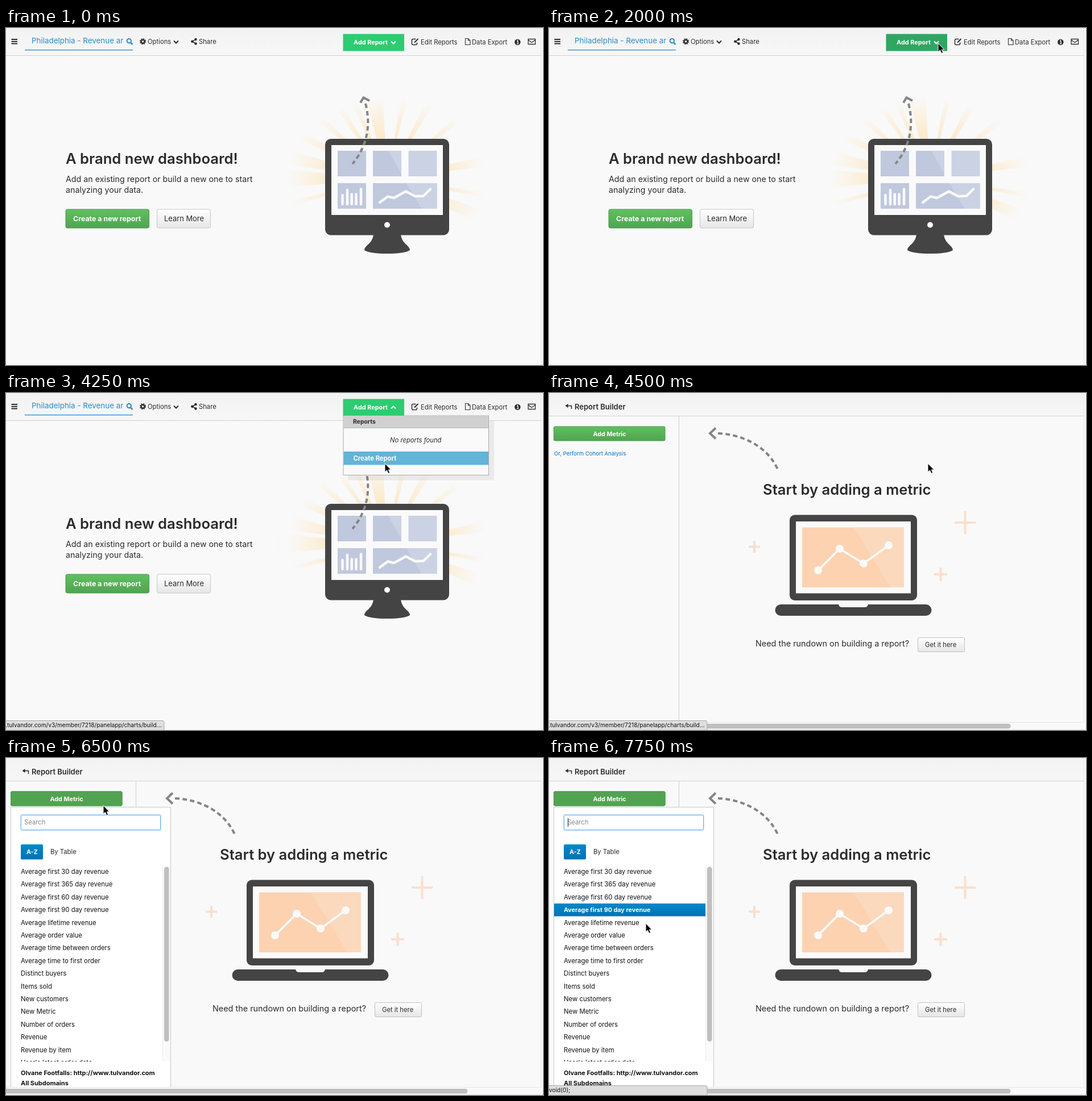
An HTML page for the animation above (8 s loop, 944 by 593 pixels).

```html
<!DOCTYPE html>
<html lang="en">
<head>
<meta charset="utf-8">
<title>Report builder walkthrough</title>
<style>
html, body { margin: 0; width: 100%; height: 100%; overflow: hidden; background: #f9f9f9; }
svg { display: block; width: 944px; height: 593px; font: 11.25px Inter, "Open Sans", sans-serif; font-optical-sizing: none; fill: #2b2b2b; }
.bold { font-weight: 700; }
.white { fill: #fff; }
.head { font-size: 25.6px; font-weight: 600; }
.copy { font-size: 14.25px; }
.line { fill: none; stroke: #2b2b2b; stroke-width: 1.5; }
.thick { stroke-width: 2; }
.dash { fill: none; stroke: #858585; stroke-width: 4; stroke-dasharray: 8 5.3; }
.tip { fill: none; stroke: #858585; stroke-width: 4; }
.plot { fill: none; stroke: #fafafa; stroke-width: 4.5; stroke-linecap: round; stroke-linejoin: round; }
.thin { stroke-width: 3.6; }
.dark { fill: #444; }
.plus { fill: none; stroke: #fbdfcd; stroke-width: 4; }
.status { font-size: 10.2px; fill: #111; }
.status rect { fill: #dedede; stroke: #a9a9a9; }

/* Every change is a hard cut on a quarter-second grid: 3.125% = 250 ms */
.timed { animation: 8s step-end infinite; }
#cursor { animation-name: travel; }
#addReport { animation-name: addHover; }
#chevron { animation-name: flip; transform-box: fill-box; transform-origin: center; }
#menu { animation-name: menu; }
#createRow { animation-name: createRow; }
#linkStatus { animation-name: linkStatus; }
#builder { animation-name: builder; }
#metricHover { animation-name: metricHover; }
#picker { animation-name: picker; }
#caret { animation-name: caret; }
#rowHover, #voidStatus { animation-name: rowHover; }

@keyframes travel {
  0% { transform: translate(-40px, 12px); }
  3.125% { transform: translate(833px, 12px); }
  6.25% { transform: translate(490px, 40px); }
  9.375% { transform: translate(232px, 139px); }
  18.75% { transform: translate(300px, 138px); }
  21.875% { transform: translate(570px, 66px); }
  25% { transform: translate(684px, 27px); }
  43.75% { transform: translate(685px, 48px); }
  46.875% { transform: translate(676px, 86px); }
  50% { transform: translate(668px, 115px); }
  53.125% { transform: translate(666px, 124px); }
  59.375% { transform: translate(570px, 138px); }
  62.5% { transform: translate(400px, 134px); }
  65.625% { transform: translate(255px, 112px); }
  68.75% { transform: translate(195px, 98px); }
  71.875% { transform: translate(182px, 82px); }
  75% { transform: translate(171px, 83.5px); }
  93.75% { transform: translate(171px, 190px); }
  96.875%, 100% { transform: translate(170px, 291px); }
}
@keyframes addHover { 0%, 43.75%, 100% { fill: #2ecc71; } 25% { fill: #30a663; } }
@keyframes flip { 0%, 56.25%, 100% { transform: none; } 31.25% { transform: scaleY(-1); } }
@keyframes menu { 0%, 56.25%, 100% { visibility: hidden; } 31.25% { visibility: visible; } }
@keyframes createRow { 0%, 56.25%, 100% { visibility: hidden; } 50% { visibility: visible; } }
@keyframes linkStatus { 0%, 59.375%, 100% { visibility: hidden; } 53.125% { visibility: visible; } }
@keyframes builder { 0% { visibility: hidden; } 56.25%, 100% { visibility: visible; } }
@keyframes metricHover { 0% { visibility: hidden; } 71.875%, 100% { visibility: visible; } }
@keyframes picker { 0% { visibility: hidden; } 81.25%, 100% { visibility: visible; } }
@keyframes caret { 0%, 90.625% { visibility: hidden; } 84.375%, 96.875%, 100% { visibility: visible; } }
@keyframes rowHover { 0% { visibility: hidden; } 96.875%, 100% { visibility: visible; } }
</style>
</head>
<body>
<svg viewBox="0 0 944 593">
  <defs>
    <linearGradient id="bar" x2="0" y2="1"><stop stop-color="#f2f2f2"/><stop offset="1" stop-color="#f7f7f7"/></linearGradient>
    <linearGradient id="green" x2="0" y2="1"><stop stop-color="#60c060"/><stop offset="1" stop-color="#51a351"/></linearGradient>
    <linearGradient id="grey" x2="0" y2="1"><stop stop-color="#fff"/><stop offset="1" stop-color="#e6e6e6"/></linearGradient>
    <linearGradient id="blue" x2="0" y2="1"><stop stop-color="#08c"/><stop offset="1" stop-color="#0072b5"/></linearGradient>
    <radialGradient id="glow" gradientUnits="userSpaceOnUse" cx="0" cy="0" r="176" gradientTransform="scale(1 .82)">
      <stop offset=".45" stop-color="#fce8c6"/><stop offset=".75" stop-color="#fbf1e0"/><stop offset="1" stop-color="#f9f9f9"/>
    </radialGradient>
    <clipPath id="listClip"><rect x="9" y="188" width="266" height="346"/></clipPath>
    <clipPath id="paneClip"><rect y="80" width="300" height="499"/></clipPath>
  </defs>

  <!-- Dashboard -->
  <rect width="944" height="593" fill="#f9f9f9"/>
  <rect width="940" height="48" fill="url(#bar)"/>
  <path d="M0 48.5H940" stroke="#d0d0d0"/>
  <path d="M940.5 0V593" stroke="#e4e4e4"/>

  <path d="M9.500 20H20M9.500 23.700H20M9.500 27.400H20" class="line thick"/>
  <g fill="#2a8cc8">
    <text x="45" y="27" font-size="13.400">Philadelphia - Revenue ar</text>
    <rect x="33" y="38" width="190" height="1.300"/>
    <path d="M219.300 25.800L222.500 29" stroke="#2a8cc8" stroke-width="2.500"/>
    <circle cx="216.300" cy="22.600" r="3.700" fill="none" stroke="#2a8cc8" stroke-width="2"/>
  </g>
  <circle cx="240.500" cy="23.700" r="4.600" fill="none" stroke="#333" stroke-width="2" stroke-dasharray="2 1.610"/>
  <circle cx="240.500" cy="23.700" r="3" fill="none" stroke="#333" stroke-width="2.500"/>
  <text x="249" y="28">Options</text>
  <path d="M295 22.500L299 26.500L303 22.500" class="line thick"/>
  <path d="M333.500 20L327.500 23.700L333.500 27.500" class="line"/>
  <circle cx="333.500" cy="20" r="2.200"/><circle cx="327.300" cy="23.700" r="2.200"/><circle cx="333.500" cy="27.500" r="2.200"/>
  <text x="339" y="28">Share</text>

  <rect id="addReport" class="timed" x="592.500" y="10.500" width="107.500" height="30" fill="#2ecc71"/>
  <text x="611" y="29" class="bold white" font-size="10.900">Add Report</text>
  <path id="chevron" class="timed" d="M677 23.500L681 27.500L685 23.500" fill="none" stroke="#fff" stroke-width="2.200"/>
  <path d="M720.500 19.500H715.500Q713.500 19.500 713.500 21.500V27.500Q713.500 29.500 715.500 29.500H720.500Q722.500 29.500 722.500 27.500V25.500" class="line"/>
  <path d="M718 25.500L724.500 19" class="line thick"/>
  <text x="729" y="29">Edit Reports</text>
  <path d="M807.500 18.500H812.500L816 22V29.500H807.500ZM812.500 18.500V22H816" fill="none" stroke="#333" stroke-width="1.100"/>
  <text x="819" y="29">Data Export</text>
  <circle cx="899.300" cy="24.700" r="5.200"/>
  <path d="M898 23.500H900V27.500M897.700 27.700H901.200M898.500 21.500H900.300" fill="none" stroke="#fff" stroke-width="1.300"/>
  <path d="M918 19.500H930.500V28.500H918ZM918 21L924.200 25.500L930.500 21" fill="none" stroke="#333" stroke-width="1.300"/>

  <text x="105" y="239" class="head">A brand new dashboard!</text>
  <text y="271" class="copy"><tspan x="105">Add an existing report or build a new one to start</tspan><tspan x="105" dy="19">analyzing your data.</tspan></text>
  <rect x="105" y="319" width="146.500" height="33" rx="3" fill="url(#green)" stroke="#4b994b"/>
  <text x="118" y="340" class="bold white" font-size="12.400">Create a new report</text>
  <rect x="265.500" y="319" width="94" height="33" rx="3" fill="url(#grey)" stroke="#c6c6c6"/>
  <text x="278" y="340" font-size="12.900">Learn More</text>

  <g id="rays" transform="translate(670 265)" fill="url(#glow)"></g>
  <path class="dark" d="M646 362C645 380 630 382 630 391Q640 397 670 397Q700 397 710 391C710 382 695 380 694 362Z"/>
  <rect class="dark" x="561" y="195" width="218" height="169.500" rx="10"/>
  <rect x="572" y="206" width="196" height="123" fill="#fafafa"/>
  <path d="M583 216h50v45h-50zM645 216h50v45h-50zM583 273h50v45h-50zM645 273h112.500v45H645z" fill="#c0c8dd"/>
  <path d="M707.500 216h50v45h-50zM672 216H695V257ZM704 273H757.500V318H730.500Z" fill="#cbd2e3"/>
  <path class="plot" d="M591.500 294V310M600 285V310M607.700 292.500V310M615.500 292.500V310M624 283.500V310"/>
  <path class="plot" d="M657 307L671 296.500L682 299L703 287.500L719 296L734 295.500L746 283.500"/>
  <circle cx="670" cy="346.500" r="5" class="white"/>
  <path class="dash" d="M632 133C643 175 632 212 609 239"/>
  <path class="tip" d="M623 131.500L628.500 122.500L639 128"/>

  <g id="menu" class="timed">
    <rect x="601" y="49" width="257" height="104.500" fill="#000" fill-opacity=".06"/>
    <rect x="593" y="40" width="255.500" height="104.500" fill="#fafafa" stroke="#aaa"/>
    <rect x="593.500" y="40.500" width="254.500" height="20.500" fill="#d0d0d0"/>
    <path d="M593 61.500H848" stroke="#b4b4b4"/>
    <text x="610" y="54" class="bold" font-size="10.400">Reports</text>
    <text x="675" y="87" font-style="italic">No reports found</text>
    <text x="610.500" y="119" class="bold" font-size="11.200">Create Report</text>
  </g>
  <g id="createRow" class="timed">
    <rect x="593.500" y="103" width="254.500" height="23.500" fill="#62b4d9"/>
    <text x="610.500" y="119" class="bold white" font-size="11.200">Create Report</text>
  </g>

  <!-- Report builder -->
  <g id="builder" class="timed">
    <rect width="944" height="593" fill="#f9f9f9"/>
    <rect width="940" height="40" fill="url(#bar)"/>
    <path d="M0 40.500H940" stroke="#d0d0d0"/>
    <path d="M228.500 41V579" stroke="#cfcfcf"/>
    <path d="M940.500 0V579M0 579.500H941M0 592.500H944" stroke="#e6e6e6" fill="none"/>
    <rect x="-10" y="582" width="821.500" height="8.500" rx="4.200" fill="#bfbfbf"/>
    <path d="M31 22.500H39.500V28" class="line"/>
    <path d="M28.500 22.500L33.500 19V26Z"/>
    <text x="45" y="28.500" font-size="13" font-weight="600">Report Builder</text>
    <rect x="8.500" y="59" width="195.500" height="25" rx="2" fill="url(#green)" stroke="#4b994b"/>
    <rect id="metricHover" class="timed" x="8.500" y="59" width="195.500" height="25" rx="2" fill="#51a351" stroke="#4b994b"/>
    <text x="77.500" y="76" class="bold white" font-size="10.800">Add Metric</text>
    <text x="9" y="109.500" font-size="9.550" fill="#0a6ebd">Or, Perform Cohort Analysis</text>

    <path class="dash" d="M297 71C340 73 383 93 402 134"/>
    <path class="tip" d="M293 61.500L283 71L293 80.500"/>
    <text x="376" y="178.500" class="head" font-size="25.300">Start by adding a metric</text>
    <rect class="dark" x="423" y="214.500" width="224" height="150.500" rx="9"/>
    <rect x="434" y="226" width="202" height="126.500" fill="#fafafa"/>
    <rect x="445" y="236.500" width="179" height="105.500" fill="#fcd2b1"/>
    <path d="M536 236.500H624V342H600Z" fill="#fbd9bd"/>
    <path class="plot thin" d="M473 312L511 274L553 300L597 268"/>
    <g fill="#fafafa"><circle cx="473" cy="312" r="7"/><circle cx="511" cy="274" r="7"/><circle cx="553" cy="300" r="7"/><circle cx="597" cy="268" r="7"/></g>
    <rect class="dark" x="397.500" y="372" width="275" height="20" rx="10"/>
    <path d="M509 371.500H561Q560 377 555 377H515Q510 377 509 371.500Z" fill="#f9f9f9"/>
    <path class="plus" d="M713 228H750M731.500 208V248M351 270.500H371M361 260V281M677 319H700M688.500 307V331"/>
    <text x="363" y="446" font-size="14.400">Need the rundown on building a report?</text>
    <rect x="648.500" y="430.500" width="82" height="25" rx="2" fill="url(#grey)" stroke="#c0c0c0"/>
    <text x="661" y="447">Get it here</text>
  </g>

  <g id="picker" class="timed" clip-path="url(#paneClip)">
    <rect x="8.500" y="86.500" width="281" height="520" fill="#fff" stroke="#c8c8c8"/>
    <rect x="25" y="99" width="248" height="29" rx="3" fill="#cfe6f9"/>
    <rect x="26.500" y="100.500" width="245" height="26" rx="2" fill="#fff" stroke="#5fafee"/>
    <text x="32" y="117" fill="#888">Search</text>
    <rect x="26" y="152" width="39" height="26.500" rx="2" fill="url(#blue)"/>
    <text x="36" y="169" class="bold white" font-size="10.700">A-Z</text>
    <text x="78" y="169">By Table</text>
    <g clip-path="url(#listClip)"><text id="metrics" y="204" font-size="11.350" fill="#111"></text></g>
    <rect x="275" y="189" width="14" height="345" fill="#fafafa"/>
    <path d="M275.500 189V534" stroke="#ececec"/>
    <rect x="278" y="191.500" width="8.500" height="307.500" rx="4.200" fill="#bfbfbf"/>
    <text y="558" class="bold" font-size="11" fill="#111"><tspan x="26">Olvane Footfalls: http://www.tulvandor.com</tspan><tspan x="26" dy="17.500">All Subdomains</tspan></text>
  </g>
  <path id="caret" class="timed" d="M33.500 106V121" stroke="#222"/>
  <g id="rowHover" class="timed">
    <rect x="9" y="256" width="266" height="22.500" fill="url(#blue)"/>
    <text x="26" y="271.200" class="bold white" font-size="10.800">Average first 90 day revenue</text>
  </g>

  <g id="linkStatus" class="timed status">
    <rect x="-4" y="576.500" width="282" height="22" rx="3"/>
    <text x="-1" y="588">.tulvandor.com/v3/member/7218/panelapp/charts/build…</text>
  </g>
  <g id="voidStatus" class="timed status">
    <rect x="-4" y="576.500" width="282" height="22" rx="3"/>
    <text x="0" y="588">void(0);</text>
  </g>

  <path id="cursor" class="timed" d="M0 0V15L3.500 12L6 17.500L8.700 16.400L6.300 11H10.800Z" fill="#000" stroke="#fff"/>
</svg>
<script>
// Sun rays as wedges between pairs of angles, in degrees
const rays = [[93, 105], [76, 80], [58, 63], [38, 42], [7, 13], [-11, -8], [-26, -18],
  [193, 196], [175, 185], [164, 172], [151, 156], [136, 140], [122, 126], [111, 115]];
const point = deg => {
  const a = deg * Math.PI / 180;
  return `${190 * Math.cos(a)} ${-190 * Math.sin(a)}`;
};
document.getElementById("rays").innerHTML =
  rays.map(([from, to]) => `<path d="M0 0L${point(from)}L${point(to)}Z"/>`).join("");

const metrics = [
  ...["30 day", "365 day", "60 day", "90 day"].map(span => `Average first ${span} revenue`),
  "Average lifetime revenue", "Average order value", "Average time between orders",
  "Average time to first order", "Distinct buyers", "Items sold", "New customers", "New Metric",
  "Number of orders", "Revenue", "Revenue by item", "User's latest order date"];
document.getElementById("metrics").innerHTML =
  metrics.map((name, i) => `<tspan x="26" y="${204 + i * 22.4}">${name}</tspan>`).join("");
</script>
</body>
</html>
```
